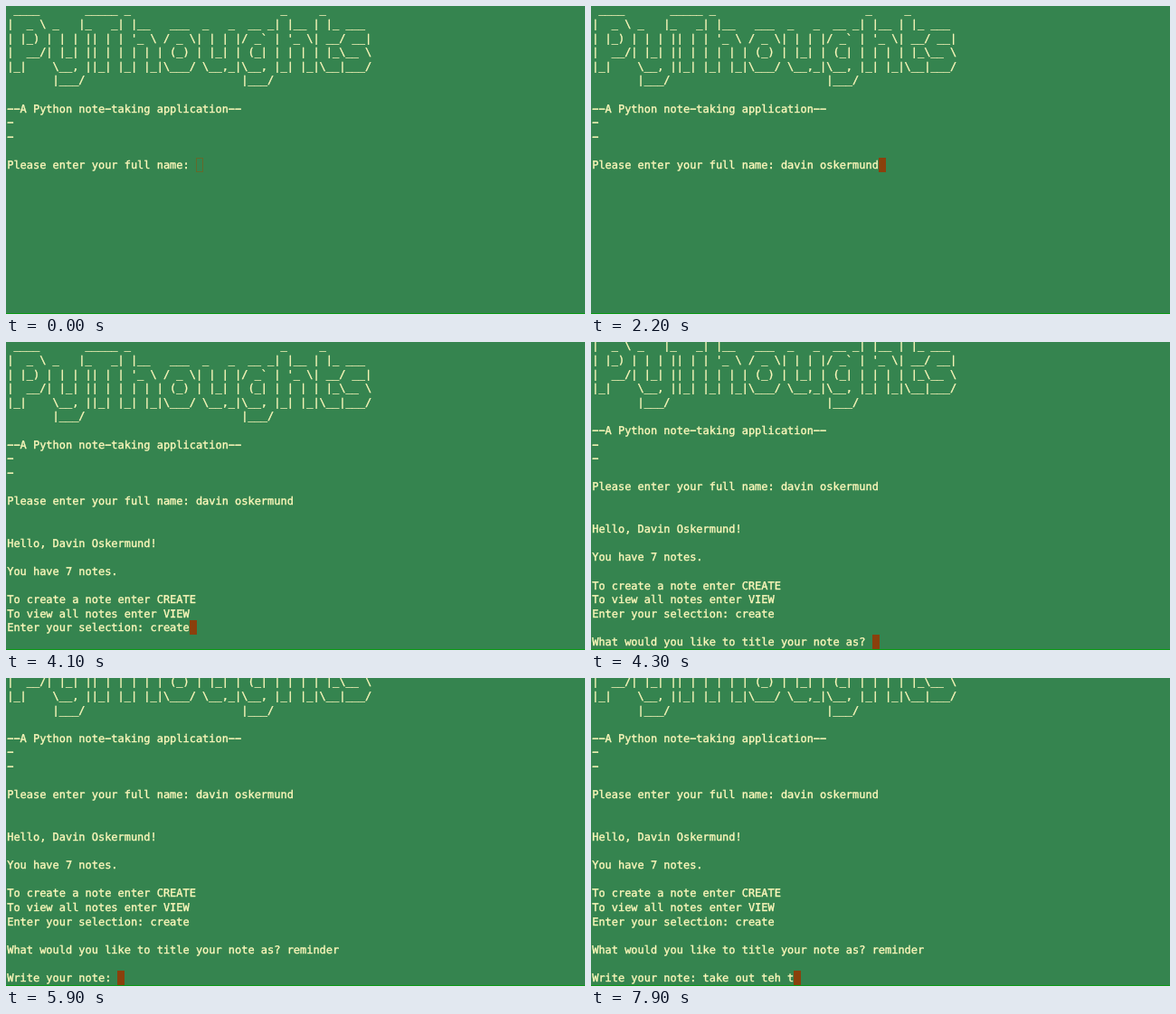
These frames come from a looping animation (640 by 341 pixels, 8 s). An HTML page:

```html
<!DOCTYPE html>
<html lang="en">
<head>
<meta charset="utf-8">
<title>Note-taking terminal</title>
<style>
  html, body { margin: 0; width: 100%; height: 100%; overflow: hidden; background: #35844f; }
  #stage { position: relative; width: 640px; height: 341px; overflow: hidden; background: #35844f; }
  #text {
    position: absolute; left: 1.2px; top: -2.6px; margin: 0;
    font: 11.96px/15.6px "DejaVu Sans Mono", Menlo, monospace;
    font-variant-ligatures: none; text-rendering: geometricPrecision;
    -webkit-text-stroke: 0.35px #fff9bc;
    white-space: pre; color: #fff9bc;
  }
  #cursor { position: absolute; box-sizing: border-box; width: 8px; height: 16px; background: #8a400c; }
  #cursor.idle { background: none; border: 1px solid #626a2c; }
  #edge { position: absolute; left: 0; bottom: 0; width: 100%; height: 1px; background: #0c9a14; }
</style>
</head>
<body>
<div id="stage">
  <div id="cursor"></div>
  <pre id="text"></pre>
  <div id="edge"></div>
</div>
<script>
const LOOP = 8000, ROWS = 22, CELL_W = 7.2, CELL_H = 15.6, LEFT = 1, TOP = -3.7;
const FOCUS_AT = 100;

const banner = String.raw`
 ____       _____ _                       _     _
|  _ \ _   |_   _| |__   ___  _   _  __ _| |__ | |_ ___
| |_) | | | || | | '_ \ / _ \| | | |/ _${'`'} | '_ \| __/ __|
|  __/| |_| || | | | | | (_) | |_| | (_| | | | | |_\__ \
|_|    \__, ||_| |_| |_|\___/ \__,_|\__, |_| |_|\__|___/
       |___/                        |___/

−−A Python note−taking application−−
−
−

`.slice(1);

const name = 'davin oskermund';
const fullName = name.replace(/\b\w/g, c => c.toUpperCase());

// Evenly spaced key times
const keys = (start, count) => Array.from({ length: count }, (_, i) => start + i * 100);

// Each prompt appears at its time; the answer is typed one key at a time
const prompts = [
  { at: 0, ask: banner + 'Please enter your full name: ', answer: name,
    keys: [800, 900, 1000, 1300, ...keys(1300, 7), 2000, ...keys(2000, 3)] },
  { at: 2400, ask: `\n\n\nHello, ${fullName}!\n\nYou have 7 notes.\n\n` +
      'To create a note enter CREATE\nTo view all notes enter VIEW\nEnter your selection: ',
    answer: 'create', keys: keys(3500, 6) },
  { at: 4200, ask: '\n\nWhat would you like to title your note as? ',
    answer: 'reminder', keys: keys(4800, 8) },
  { at: 5700, ask: '\n\nWrite your note: ',
    answer: 'take out teh t', keys: keys(6600, 14) },
];

const text = document.getElementById('text');
const cursor = document.getElementById('cursor');
let shown = null;

function screenAt(t) {
  return prompts
    .filter(p => t >= p.at)
    .map(p => p.ask + p.answer.slice(0, p.keys.filter(k => t >= k).length))
    .join('');
}

function draw() {
  const t = performance.now() % LOOP;
  const screen = screenAt(t);
  cursor.className = t < FOCUS_AT ? 'idle' : '';
  if (screen !== shown) {
    shown = screen;
    const lines = screen.split('\n').slice(-ROWS);
    const row = lines.length - 1;
    text.textContent = lines.join('\n');
    cursor.style.left = LEFT + lines[row].length * CELL_W + 'px';
    cursor.style.top = TOP + row * CELL_H + 'px';
  }
  requestAnimationFrame(draw);
}
draw();
</script>
</body>
</html>
```
